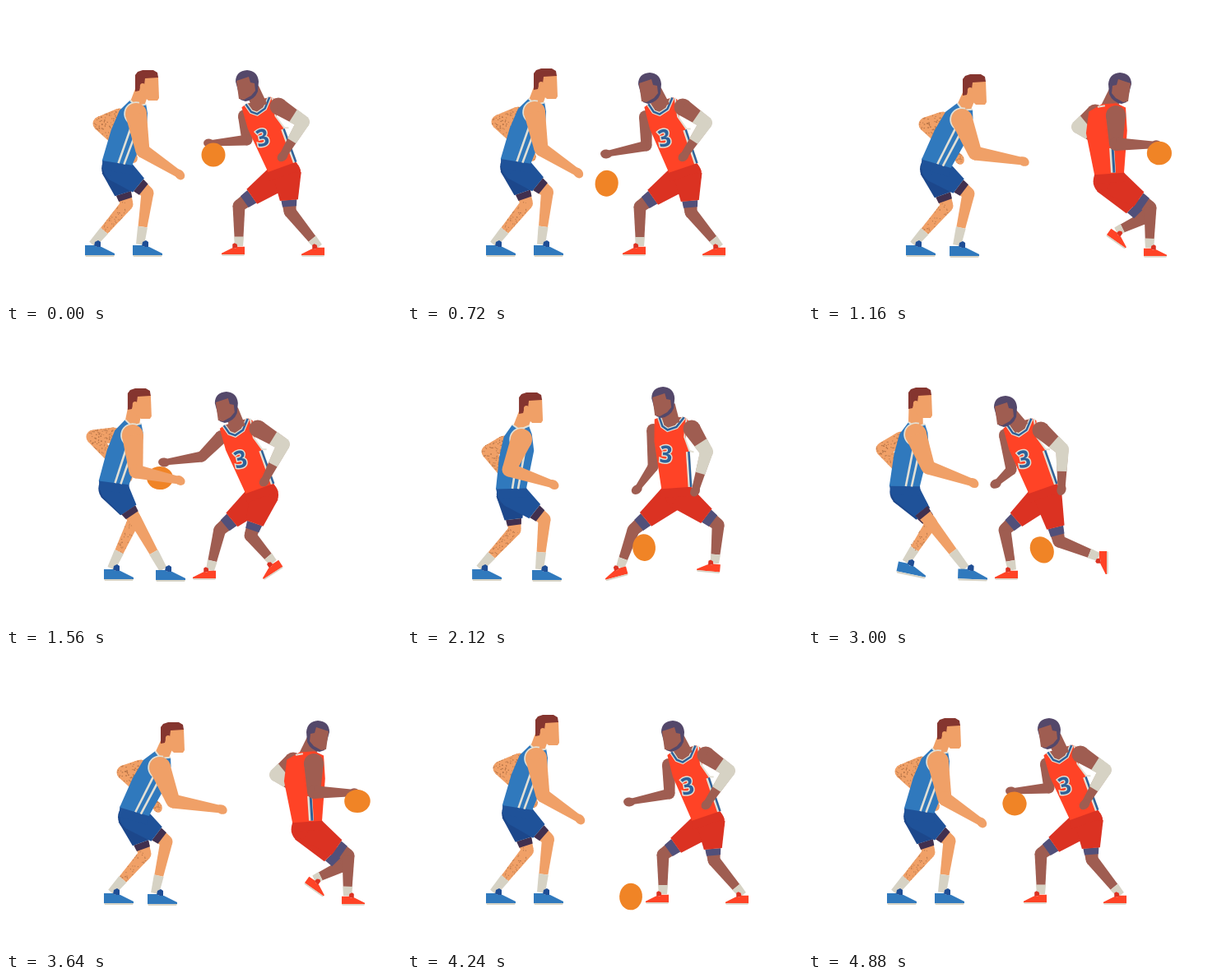
An HTML page with a canvas that plays this animation: 480x360 px, repeating every 4920 ms.

```html
<!DOCTYPE html>
<html lang="en">
<head>
<meta charset="utf-8">
<title>One on one</title>
<style>
html, body { margin: 0; width: 100%; height: 100%; overflow: hidden; background: #fff; }
canvas { display: block; width: 100%; height: 100%; }
</style>
</head>
<body>
<canvas id="stage" width="480" height="360"></canvas>
<script>
const ctx = document.getElementById('stage').getContext('2d');
const LOOP = 4920, CYCLE = 1240, STARTS = [1160, 2400];
const CREAM = '#d6d2c4';

// Pose: head, shoulders A and B, waist, elbow+hand A, elbow+hand B,
// then per leg: knee, foot, foot angle in degrees.
const blue = {
  idle: [157,78, 158,131, 138,134, 136,189, 166,176, 211,205, 114,143, 154,184, 147,241, 114,304,0, 172,227, 172,304,0],
  cross: [148,71, 154,128, 131,128, 132,184, 158,172, 211,183, 106,130, 148,178, 156,230, 137,304,0, 157,230, 200,305,0],
  slide: [122,70, 131,127, 113,133, 118,188, 146,167, 201,186, 91,145, 126,186, 150,235, 125,298,12, 146,230, 200,304,2],
  step: [126,68, 132,128, 113,133, 118,187, 128,170, 182,187, 90,144, 125,186, 114,238, 74,301,-6, 154,230, 173,304,0],
  back: [136,76, 139,133, 118,138, 127,191, 124,170, 178,188, 99,148, 130,190, 131,243, 97,304,0, 167,230, 170,305,0],
  right: [188,83, 187,138, 164,138, 157,190, 203,179, 262,189, 143,144, 184,186, 169,243, 137,304,0, 195,228, 190,305,0]
};
const red = {
  idle: [279,78, 290,134, 331,122, 335,195, 293,163, 247,167, 361,141, 336,183, 283,243, 276,303,0, 345,250, 373,304,0],
  low: [281,81, 290,135, 335,123, 335,196, 291,170, 242,180, 363,142, 336,183, 283,244, 276,303,0, 345,251, 373,304,0],
  reach: [254,75, 262,130, 306,120, 308,192, 238,154, 192,161, 337,139, 314,184, 260,243, 241,303,0, 297,250, 325,296,-33],
  push: [226,80, 240,128, 283,122, 285,192, 247,170, 228,187, 309,145, 308,194, 239,243, 241,303,0, 305,257, 364,283,-90],
  wide: [297,69, 299,122, 346,120, 327,191, 299,166, 279,194, 364,148, 350,196, 275,243, 255,301,-15, 378,237, 366,294,5],
  run: [365,81, 374,133, 349,130, 366,203, 374,168, 424,169, 328,147, 352,165, 408,258, 374,287,35, 416,245, 422,305,0]
};

// Moves the body, and the feet separately; knees follow halfway.
const shift = (pose, dx, dy = 0, feet = 0) => pose.map((v, i) => {
  if (i < 16) return v + (i % 2 ? dy : dx);
  const k = (i - 16) % 5;
  return v + [(dx + feet) / 2, dy / 2, feet, 0, 0][k];
});
const repeat = keys => STARTS.flatMap(s => keys.map(([t, ...rest]) => [s + t, ...rest]));

const blueKeys = [
  [0, blue.idle], [300, shift(blue.idle, -1, -4)], [540, blue.idle],
  [720, shift(blue.idle, -3, -2)], [880, blue.idle],
  ...repeat([[0, blue.right], [400, blue.cross], [600, blue.slide], [760, blue.step], [960, blue.back]]),
  [3640, blue.right], [3960, blue.idle], [4240, shift(blue.idle, -1, -4)], [4500, blue.idle],
  [4680, shift(blue.idle, -1, -4)], [4880, blue.idle], [LOOP, blue.idle]
];
const redKeys = [
  [0, red.idle], [300, red.low], [540, red.idle], [720, red.low], [840, red.low],
  ...repeat([[0, red.run], [400, red.reach], [600, red.push], [960, red.wide]]),
  [3640, red.run], [3960, shift(red.idle, 28, 0, 28)], [4240, shift(red.low, 28, 0, 28)],
  [4500, shift(red.idle, 28, 0, 28)], [4720, red.low], [4880, red.idle], [LOOP, red.idle]
];
const ballKeys = [
  [0, 252, 181], [40, 252, 181], [300, 243, 296], [540, 251, 181], [600, 252, 181], [820, 235, 296], [1060, 400, 180],
  ...repeat([[0, 427, 179], [80, 420, 180], [230, 300, 296], [400, 187, 180], [460, 190, 182],
    [623, 299, 296], [780, 280, 205], [800, 280, 205], [999, 290, 296]]),
  [3640, 427, 179], [3700, 424, 180], [3850, 340, 296], [4000, 280, 181], [4240, 272, 296],
  [4480, 280, 181], [4680, 262, 296], [4880, 251, 182], [LOOP, 252, 181]
];

const segment = (keys, t) => {
  let i = 0;
  while (i < keys.length - 2 && keys[i + 1][0] <= t) i++;
  return i;
};

// Monotone cubic interpolation between poses.
function poseAt(keys, t) {
  const i = segment(keys, t), [t0, a] = keys[i], [t1, b] = keys[i + 1];
  const h = t1 - t0, u = (t - t0) / h;
  const slope = (k, j) => keys[k] && keys[k + 1]
    ? (keys[k + 1][1][j] - keys[k][1][j]) / (keys[k + 1][0] - keys[k][0]) : 0;
  const tangent = (k, j) => {
    const p = slope(k - 1, j), q = slope(k, j);
    return p * q > 0 ? 2 * p * q / (p + q) : 0;
  };
  return a.map((v, j) => {
    const m0 = tangent(i, j) * h, m1 = tangent(i + 1, j) * h, d = b[j] - v;
    return v + u * (m0 + u * (3 * d - 2 * m0 - m1 + u * (m0 + m1 - 2 * d)));
  });
}

function ballAt(t) {
  const i = segment(ballKeys, t), [t0, x0, y0] = ballKeys[i], [t1, x1, y1] = ballKeys[i + 1];
  const u = (t - t0) / (t1 - t0);
  const drop = y1 > y0 ? u * u : 1 - (1 - u) ** 2;
  return [x0 + (x1 - x0) * u, y0 + (y1 - y0) * drop];
}

function makeStipple() {
  const tile = document.createElement('canvas');
  tile.width = tile.height = 64;
  const g = tile.getContext('2d');
  g.fillStyle = '#b9774a';
  let seed = 7;
  const random = () => (seed = seed * 16807 % 2147483647) / 2147483647;
  for (let i = 0; i < 330; i++) g.fillRect(random() * 64, random() * 64, 1.1, 1.1);
  return ctx.createPattern(tile, 'repeat');
}
const stipple = makeStipple();

const mix = (a, b, u) => [a[0] + (b[0] - a[0]) * u, a[1] + (b[1] - a[1]) * u];

function trace(points) {
  ctx.beginPath();
  points.forEach(p => ctx.lineTo(...p));
}
function poly(color, ...points) {
  trace(points);
  ctx.closePath();
  ctx.fillStyle = color;
  ctx.fill();
}
function line(color, width, ...points) {
  trace(points);
  ctx.strokeStyle = color;
  ctx.lineWidth = width;
  ctx.stroke();
}
function disc(color, [x, y], rx, ry = rx, angle = 0) {
  ctx.beginPath();
  ctx.ellipse(x, y, rx, ry, angle, 0, 7);
  ctx.fillStyle = color;
  ctx.fill();
}
// Tapered bar with flat ends.
function bar(color, a, b, wa, wb) {
  const n = Math.atan2(b[1] - a[1], b[0] - a[0]) + Math.PI / 2;
  const side = (p, w) => [p[0] + Math.cos(n) * w / 2, p[1] + Math.sin(n) * w / 2];
  poly(color, side(a, wa), side(b, wb), side(b, -wb), side(a, -wa));
}
function at([x, y], angle, sx, draw) {
  ctx.save();
  ctx.translate(x, y);
  ctx.rotate(angle);
  ctx.scale(sx, Math.abs(sx));
  draw();
  ctx.restore();
}

function readPose(p) {
  const pt = i => [p[i], p[i + 1]];
  const leg = i => ({ knee: pt(i), foot: pt(i + 2), angle: p[i + 4] * Math.PI / 180 });
  const body = {
    head: pt(0), sA: pt(2), sB: pt(4), waist: pt(6),
    armA: [pt(2), pt(8), pt(10)], armB: [pt(4), pt(12), pt(14)], legL: leg(16), legR: leg(21)
  };
  const mid = mix(body.sA, body.sB, .5);
  body.tilt = Math.atan2(mid[0] - body.waist[0], body.waist[1] - mid[1]);
  const c = Math.cos(body.tilt), s = Math.sin(body.tilt);
  body.local = (x, y) => [body.waist[0] + x * c - y * s, body.waist[1] + x * s + y * c];
  return body;
}

function arm([shoulder, elbow, hand], skin, widths) {
  const [ws, we, wh] = widths;
  disc(skin, shoulder, ws / 2);
  bar(skin, shoulder, elbow, ws, we);
  disc(skin, elbow, we / 2);
  bar(skin, elbow, hand, we, wh);
  const angle = Math.atan2(hand[1] - elbow[1], hand[0] - elbow[0]);
  disc(skin, hand, 7, 5.5, angle + .3);
}

function shoe(foot, angle, scale, color, dark) {
  at(foot, angle, scale, () => {
    ctx.translate(-18, 0);
    poly(dark, [11,-12], [12,-17], [16,-19], [19,-17], [19,-10]);
    poly(color, [0,-1], [0,-13], [11,-13], [14,-11], [20,-11], [36,-3], [36,-1]);
    poly(CREAM, [0,-1], [36,-1], [35,1], [1,1]);
  });
}

function leg(hip, { knee, foot, angle }, look, skin, shorts) {
  const f = look.size, c = Math.cos(angle), s = Math.sin(angle);
  const ax = -9 * f, ay = -14 * Math.abs(f);
  const ankle = [foot[0] + ax * c - ay * s, foot[1] + ax * s + ay * c];
  const hem = mix(hip, knee, .7), cuff = mix(knee, ankle, look.sock);
  bar(skin, hem, knee, 18, 15);
  disc(skin, knee, 7.5);
  bar(skin, knee, cuff, 15, 11);
  bar(CREAM, cuff, ankle, 12, 10);
  shoe(foot, angle, f, look.shoe, look.tongue);
  bar(look.band, hem, mix(hip, knee, .87), 19, 17);
  disc(shorts, hip, 17);
  bar(shorts, hip, hem, 35, 22);
}

function drawBlue(p) {
  const b = readPose(p), skin = '#f0a067';
  const look = { size: 1, sock: .66, shoe: '#3079bd', tongue: '#1f4e95', band: '#41304f' };
  for (const tone of [skin, stipple]) arm(b.armB, tone, [19, 17, 10]);
  const far = b.local(-1, 9);
  leg(far, b.legL, look, skin, '#1c478b');
  const shin = mix(b.legL.knee, [b.legL.foot[0] - 9, b.legL.foot[1] - 14], look.sock);
  bar(stipple, b.legL.knee, shin, 15, 11);
  leg(b.local(1, 8), b.legR, look, skin, '#1f5299');

  bar(skin, [b.head[0] + 9, b.head[1] + 23], b.local(8, -70), 17, 18);
  at(b.waist, b.tilt, 1, () => {
    poly('#1f5299', [-19,2], [18,0], [20,12], [-16,14]);
    poly('#3079bd', [-19,3], [-16,-36], [-11,-61], [-1,-76], [8,-71], [19,-75], [23,-65], [26,-45], [18,1]);
    line('#e3e0d5', 2, [-1,-76], [8,-70], [19,-75]);
    line('#e3e0d5', 2.6, [7,-45], [1,2]);
    line('#e3e0d5', 2.6, [15,-45], [8,2]);
  });
  at(b.head, 0, 1, () => {
    poly(skin, [5,8], [28,8], [29,34], [27,37], [16,37], [5,27]);
    poly('#85352f', [0,26], [0,6], [3,2], [9,0], [22,0], [27,3], [28,9], [12,10], [11,18], [7,17], [5,25]);
    disc(skin, [9, 20], 3.2, 4);
  });
  ctx.beginPath();
  ctx.arc(...b.sA, 13.5, 1.9, 5);
  ctx.strokeStyle = '#e3e0d5';
  ctx.lineWidth = 2.5;
  ctx.stroke();
  arm(b.armA, skin, [26, 17, 9]);
}

function redTorso(b, facingRight, skin) {
  at(b.waist, b.tilt, 1, () => {
    poly('#db3222', [-18,0], [18,0], [20,12], [-20,12]);
    if (facingRight) {
      poly('#ff4326', [-18,1], [-25,-50], [-20,-76], [-4,-84], [14,-84], [25,-78], [25,-50], [18,1]);
      line('#e3e0d5', 2, [-9,-81], [0,-82]);
      line('#e3e0d5', 6, [5,-30], [5,0]);
      line('#2f6299', 3, [6,-30], [6,0]);
      return;
    }
    poly('#ff4326', [-18,1], [-23,-57], [-21,-84], [-15,-86], [16,-84], [20,-80], [15,-58], [19,-41], [18,1]);
    const collar = [[-15,-86], [-12,-75], [-6,-70], [5,-73], [15,-84]];
    poly(skin, ...collar);
    line('#e3e0d5', 5, ...collar);
    line('#2f6299', 2.5, ...collar);
    line('#e3e0d5', 2, [18,-83], [14,-60], [19,-43], [24,-41]);
    line('#e3e0d5', 5, [17,-42], [17,1]);
    line('#2f6299', 2.5, [18,-42], [18,1]);
    ctx.translate(-10, -41);
    ctx.rotate(.13);
    ctx.font = 'bold 29px "Noto Sans Mono", "DejaVu Sans Mono", monospace';
    ctx.textAlign = 'center';
    ctx.lineWidth = 3;
    ctx.strokeStyle = '#e3e0d5';
    ctx.fillStyle = '#2f6299';
    ctx.strokeText('3', 0, 10.5);
    ctx.fillText('3', 0, 10.5);
  });
}

function redHead(head, facingRight, skin) {
  at([head[0] + 14, head[1]], 0, facingRight ? -1 : 1, () => {
    ctx.translate(-14, 0);
    ctx.beginPath();
    ctx.moveTo(0, 14);
    ctx.quadraticCurveTo(0, 1, 14, 0);
    ctx.quadraticCurveTo(27, 1, 28, 14);
    ctx.lineTo(27, 26);
    ctx.quadraticCurveTo(23, 36, 12, 38);
    ctx.lineTo(6, 36);
    ctx.fillStyle = '#54486a';
    ctx.fill();
    poly(skin, [1,13], [16,8], [18,15], [23,16], [24,25], [19,31], [10,36], [4,35]);
  });
}

function sleeveArm(joints, skin) {
  arm(joints, skin, [21, 15, 9]);
  const [shoulder, elbow, hand] = joints;
  bar(CREAM, mix(shoulder, elbow, .6), elbow, 18, 16);
  disc(CREAM, elbow, 8);
  bar(CREAM, elbow, mix(elbow, hand, .55), 16, 12);
}

function drawRed(p, facingRight) {
  const b = readPose(p), skin = '#9f5d51';
  const look = { size: facingRight ? .78 : -.78, sock: .77, shoe: '#ff4326', tongue: '#db3222', band: '#51507a' };
  const reachArm = () => arm(b.armA, skin, facingRight ? [24, 16, 8] : [16, 13, 7]);
  const wrapArm = () => sleeveArm(b.armB, skin);
  (facingRight ? wrapArm : reachArm)();
  leg(b.local(-3, 10), b.legL, look, skin, '#db3222');
  leg(b.local(3, 10), b.legR, look, skin, '#db3222');
  if (facingRight) bar(skin, [b.head[0] + 9, b.head[1] + 24], b.local(3, -76), 18, 20);
  redTorso(b, facingRight, skin);
  if (!facingRight) bar(skin, [b.head[0] + 20, b.head[1] + 22], b.local(0, -77), 17, 19);
  redHead(b.head, facingRight, skin);
  (facingRight ? reachArm : wrapArm)();
}

function drawBall(t) {
  const [x, y] = ballAt(t), [px, py] = ballAt(Math.max(0, t - 8));
  const dx = x - px, dy = y - py;
  const stretch = Math.min(.16, Math.hypot(dx, dy) / 45);
  disc('#f08426', [x, y], 14.5 * (1 + stretch), 14.5 * (1 - stretch / 3), Math.atan2(dy, dx));
}

function render(now) {
  const t = now % LOOP;
  const facingRight = [...STARTS, 3640].some(s => t > s - 140 && t < s + 150);
  ctx.fillStyle = '#fff';
  ctx.fillRect(0, 0, 480, 360);
  drawRed(poseAt(redKeys, t), facingRight);
  drawBall(t);
  drawBlue(poseAt(blueKeys, t));
}

const start = performance.now();
function tick() {
  render(performance.now() - start);
  requestAnimationFrame(tick);
}
tick();
</script>
</body>
</html>
```
